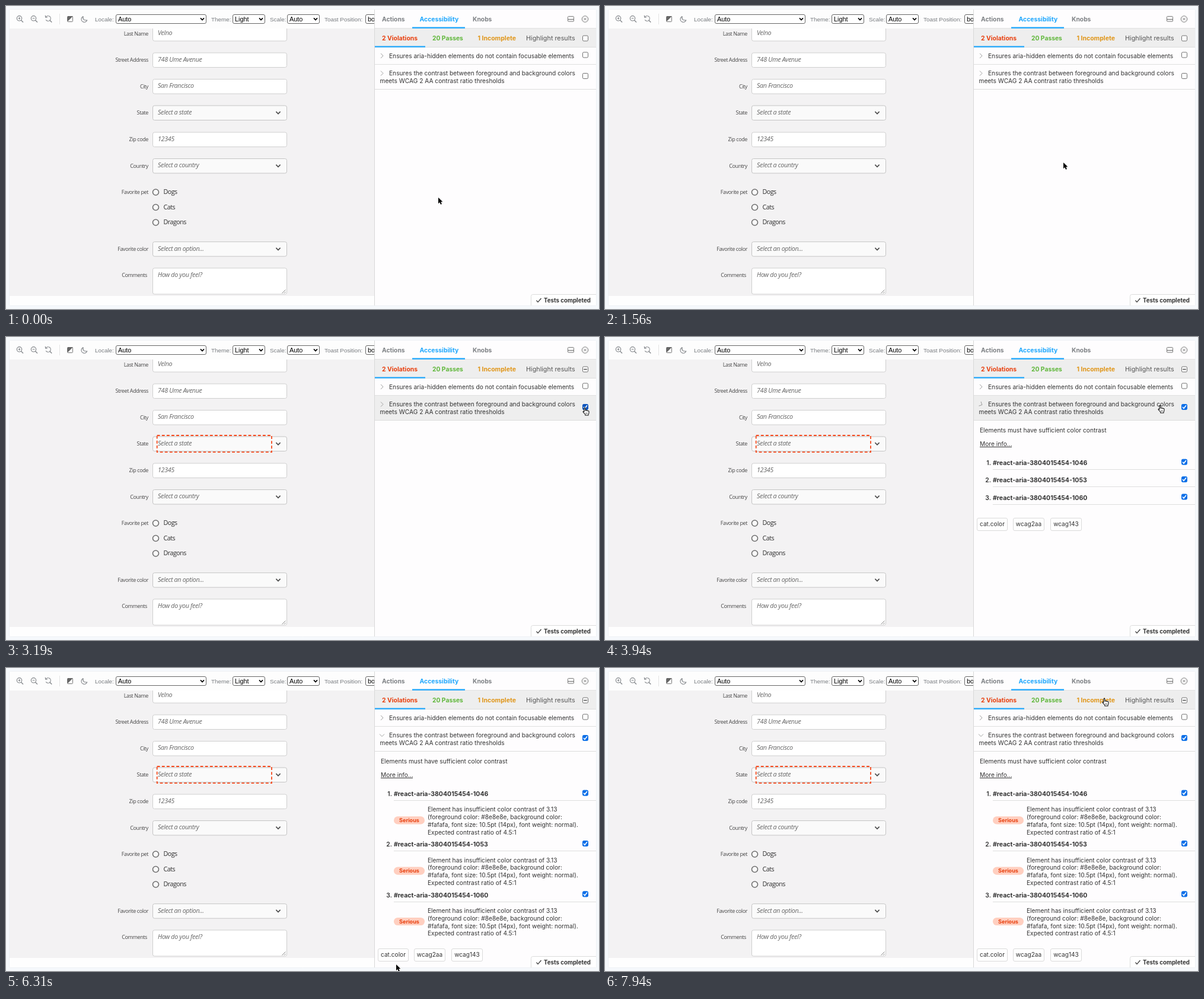
An HTML page with a canvas that plays this animation: 1000 by 511 pixels, repeating every 8000 ms.

```html
<!DOCTYPE html>
<html lang="en">
<head>
<meta charset="utf-8">
<style>
html, body { margin: 0; width: 100%; height: 100%; overflow: hidden; background: #f6f9fc; }
canvas { display: block; }
</style>
</head>
<body>
<canvas id="stage" width="1000" height="511"></canvas>
<script>
const ctx = document.getElementById('stage').getContext('2d');
const LOOP = 8000, CHECKED_AT = 2750, CLICK_AT = 3900, OPEN_AT = 4040;
const UI = 'Inter, sans-serif', FORM = '"Open Sans", sans-serif', NATIVE = '"Liberation Sans", sans-serif';
const INK = '#333', BLUE = '#1ea7fd', RED = '#e8400f';

// Pointer stops: time, x, y
const STOPS = [
  [0, 729, 323], [1150, 729, 323], [1560, 773, 264], [2350, 974, 119], [3250, 974, 119],
  [3700, 934, 115], [4200, 934, 115], [4900, 795, 406], [5400, 795, 406],
  [6200, 658, 500], [6700, 658, 500], [7700, 840, 51], [8000, 840, 51]
];

function pointerAt(time) {
  const i = Math.max(1, STOPS.findIndex(s => s[0] > time));
  const [t0, x0, y0] = STOPS[i - 1], [t1, x1, y1] = STOPS[i];
  const p = (time - t0) / (t1 - t0), e = p * p * (3 - 2 * p);
  return { x: x0 + (x1 - x0) * e, y: y0 + (y1 - y0) * e };
}

function text(str, x, y, size = 10.2, { font = UI, style = '', color = INK, align = 'left', spacing = 0 } = {}) {
  ctx.font = `${style} ${size}px ${font}`;
  ctx.letterSpacing = spacing + 'px';
  ctx.textAlign = align;
  ctx.fillStyle = color;
  ctx.fillText(str, x, y);
}

function rect(x, y, w, h, color) {
  ctx.fillStyle = color;
  ctx.fillRect(x, y, w, h);
}

function box(x, y, w, h, radius, fill, stroke, width = 1) {
  ctx.beginPath();
  ctx.roundRect(x, y, w, h, radius);
  if (fill) { ctx.fillStyle = fill; ctx.fill(); }
  if (stroke) { ctx.strokeStyle = stroke; ctx.lineWidth = width; ctx.stroke(); }
}

function line(color, width, ...points) {
  ctx.beginPath();
  for (let i = 0; i < points.length; i += 2) ctx.lineTo(points[i], points[i + 1]);
  ctx.strokeStyle = color;
  ctx.lineWidth = width;
  ctx.stroke();
}

function arc(x, y, r, color, width, from = 0, to = Math.PI * 2) {
  ctx.beginPath();
  ctx.arc(x, y, r, from, to);
  ctx.strokeStyle = color;
  ctx.lineWidth = width;
  ctx.stroke();
}

function chevronDown(x, y, w, h, color, width) {
  line(color, width, x - w, y - h, x, y + h, x + w, y - h);
}

function checkbox(x, y, state, hover) {
  const on = state === 'on';
  const blue = hover ? '#0b55bd' : '#0a6fe8';
  box(x - 4.5, y - 4.5, 9, 9, 1.8, on ? blue : '#fff', on ? blue : '#707070');
  if (on) line('#fff', 1.6, x - 3, y, x - 1, y + 2.4, x + 3, y - 2.8);
  if (state === 'mixed') line('#444', 1.4, x - 2.8, y, x + 2.8, y);
}

function nativeSelect(x, w, value) {
  box(x + .5, 14.5, w - 1, 15, 2.5, '#fff', '#666');
  text(value, x + 4, 26, 10.9, { font: NATIVE, color: '#000' });
  chevronDown(x + w - 7, 22, 3, 1.6, '#000', 1.7);
}

function toolbar() {
  rect(6, 6, 616, 32, '#fdfdfd');
  const grey = '#808488';
  [22.5, 46.5].forEach((x, i) => {
    arc(x, 20.8, 4.2, grey, 1.1);
    line(grey, 1.3, x + 3, 24, x + 6.5, 27.5);
    line(grey, 1, x - 2, 20.8, x + 2, 20.8);
    if (!i) line(grey, 1, x, 18.8, x, 22.8);
  });
  arc(71, 21, 4.3, grey, 1.1, -2.6, 2.6);
  line(grey, 1.1, 66.3, 15.8, 66.8, 19.2, 70, 19);
  line(grey, 1.3, 74, 24.2, 77.3, 27.5);
  rect(90, 13, 1, 18, '#e4e4e4');
  box(103.5, 17.5, 9, 9, 1, '#fff', '#777');
  ctx.beginPath();
  ctx.moveTo(104, 17); ctx.lineTo(113, 17); ctx.lineTo(104, 26);
  ctx.fillStyle = '#666';
  ctx.fill();
  ctx.beginPath();
  ctx.arc(132, 22.3, 5, 4.35, .35, true);
  ctx.quadraticCurveTo(128, 24.5, 130.4, 17.5);
  ctx.strokeStyle = grey;
  ctx.lineWidth = 1.1;
  ctx.stroke();

  [['Locale:', 150], ['Theme:', 346], ['Scale:', 445], ['Toast Position:', 537]].forEach(([label, x]) =>
    text(label, x, 25.6, 9.9, { font: NATIVE, color: '#777b7f' }));
  nativeSelect(185, 153, 'Auto');
  nativeSelect(382, 55, 'Light');
  nativeSelect(474, 55, 'Auto');
  nativeSelect(606, 80, 'bottom');
}

function field(label, placeholder, y, { picker = false, height = 25, labelRight = 240 } = {}) {
  const top = y - 12.5;
  text(label, labelRight, y + 3, 9, { font: FORM, color: '#464646', align: 'right', spacing: -.39 });
  box(247.5, top + .5, 226, height - .5, 3, picker ? '#fafafa' : '#fff', picker ? '#c4c4c4' : '#cfcfcf');
  text(placeholder, 256, y + 2.9, 10.7, { font: FORM, style: 'italic', color: '#646464', spacing: -.3 });
  if (picker) chevronDown(459, y, 3.6, 1.8, '#4b4b4b', 1.7);
}

function form(highlighted) {
  rect(6, 38, 616, 451, '#f3f2f3');
  rect(6, 489, 616, 16, '#fefefe');
  field('Last Name', 'Velno', 46.5);
  field('Street Address', '748 Ume Avenue', 91);
  field('City', 'San Francisco', 135.5);
  field('State', 'Select a state', 180, { picker: true });
  field('Zip code', '12345', 225);
  field('Country', 'Select a country', 269.5, { picker: true });
  text('Favorite pet', 240, 317.2, 9, { font: FORM, color: '#464646', align: 'right', spacing: -.39 });
  ['Dogs', 'Cats', 'Dragons'].forEach((pet, i) => {
    const y = 314 + i * 25.5;
    ctx.beginPath();
    ctx.arc(252.5, y, 5, 0, 7);
    ctx.fillStyle = '#fafafa';
    ctx.fill();
    arc(252.5, y, 5, '#707070', 1.6);
    text(pet, 265.5, y + 3.4, 10.7, { font: FORM, color: '#2c2c2c', spacing: -.5 });
  });
  field('Favorite color', 'Select an option...', 409.7, { picker: true });
  field('Comments', 'How do you feel?', 454, { height: 44.5, labelRight: 238 });
  line('#777', .9, 465.5, 484.5, 471.5, 478.5);
  line('#777', .9, 469, 484.5, 471.5, 482);
  if (highlighted) {
    ctx.setLineDash([4.9, 3.2]);
    ctx.strokeStyle = '#f54a1e';
    ctx.lineWidth = 1.8;
    ctx.strokeRect(254.7, 166, 193.3, 28.2);
    ctx.setLineDash([]);
  }
}

function rowArrow(y, angle) {
  ctx.save();
  ctx.translate(634, y);
  ctx.rotate(angle);
  line('#a0a0a0', 1, -2, -4, 2, 0, -2, 4);
  ctx.restore();
}

function details(open) {
  text('Elements must have sufficient color contrast', 632, 160.8);
  text('More info...', 632, 184);
  rect(632, 185, 54, 1, INK);
  const pitch = open ? 85.3 : 29.4;
  for (let i = 0; i < 3; i++) {
    const y = 216 + i * pitch;
    text(`${i + 1}.`, 651, y, 10.4, { style: '600', align: 'right' });
    text(`#react-aria-3804015454-${1046 + i * 7}`, 654, y, 10.5, { style: 'bold' });
    checkbox(977, y - 5.3, 'on');
    rect(654, Math.round(y + 7), 341, 1, '#dedede');
    if (!open) continue;
    box(654, y + 34.3, 52, 13.2, 6.6, '#ffcfc0');
    text('Serious', 680, y + 44.1, 9.1, { style: 'bold', color: RED, align: 'center' });
    ['Element has insufficient color contrast of 3.13',
      '(foreground color: #8e8e8e, background color:',
      '#fafafa, font size: 10.5pt (14px), font weight: normal).',
      'Expected contrast ratio of 4.5:1'].forEach((s, n) => text(s, 711, y + 26.4 + n * 12.75));
  }
  const tagY = open ? 473 : 305;
  [['cat.color', 627, 51], ['wcag2aa', 688, 52], ['wcag143', 751, 52]].forEach(([tag, x, w]) => {
    box(x + .5, tagY + .5, w, 21, 2.5, '#fff', '#dadada');
    text(tag, x + .5 + w / 2, tagY + 14.2, 10.1, { align: 'center' });
  });
}

function panel(time, pointer) {
  const checked = time >= CHECKED_AT;
  const hoverRow = pointer.x > 622 && pointer.y > 99 && pointer.y < 140;
  rect(622, 6, 373, 499, '#fefdfe');

  text('Actions', 634, 25.6, 10.3, { style: 'bold', color: '#7d8084' });
  text('Accessibility', 697.5, 25.6, 10.4, { style: 'bold', color: BLUE });
  text('Knobs', 787, 25.6, 10.3, { style: 'bold', color: '#7d8084' });
  box(947.5, 17.5, 10, 8.5, 1, null, '#777');
  rect(948, 22, 9, 1.2, '#777');
  arc(976.5, 22, 5.2, '#777', 1);
  line('#777', 1, 974.4, 19.9, 978.6, 24.1);
  line('#777', 1, 974.4, 24.1, 978.6, 19.9);

  rect(622, 38, 373, 32, '#eeeeee');
  rect(622, 37, 373, 1, '#e2e2e2');
  rect(685, 35.5, 89, 2.3, BLUE);
  rect(622, 69, 373, 1, '#dddddd');
  rect(622, 67.5, 85, 2.2, BLUE);
  text('2 Violations', 634, 57.6, 10.4, { style: 'bold', color: RED });
  text('20 Passes', 719, 57.6, 10.3, { style: 'bold', color: '#5fb73a' });
  text('1 Incomplete', 795.5, 57.6, 10.5, { style: 'bold', color: '#e0961a' });
  text('Highlight results', 877, 57.6, 10.8, { color: '#555' });
  checkbox(977, 54.5, checked ? 'mixed' : 'off');

  if (hoverRow) rect(622, 99, 373, 41, '#eeeeee');
  rect(622, 98, 373, 1, '#e0e0e0');
  rect(622, 140, 373, 1, '#dcdcdc');
  rowArrow(84, 0);
  text('Ensures aria-hidden elements do not contain focusable elements', 646, 87.8);
  checkbox(977, 82.5, 'off');
  const turn = Math.min(1, Math.max(0, (time - CLICK_AT) / (OPEN_AT - CLICK_AT)));
  rowArrow(113.5, turn * Math.PI / 2);
  text('Ensures the contrast between foreground and background colors', 646, 117.4);
  text('meets WCAG 2 AA contrast ratio thresholds', 630.5, 130.1);
  checkbox(977, 118, checked ? 'on' : 'off', hoverRow && pointer.x > 965);
  if (time >= CLICK_AT) details(time >= OPEN_AT);

  rect(621, 6, 1, 499, '#d8d8d8');
  box(885.5, 486.5, 112, 20, [3, 0, 0, 0], '#fff', '#dcdcdc');
  line('#333', 1.2, 894.5, 496.5, 897, 499.3, 902.5, 493);
  text('Tests completed', 907, 499.5, 9.75, { style: 'bold', color: INK });
}

const ARROW = new Path2D('M0 0V10.2L2.4 8L4 11.8L5.9 11L4.3 7.3H7.4Z');
const HAND = new Path2D('M1 1.2Q2 -.4 3 1.2V5Q4.2 4 5 5.2Q6.2 4.4 7 5.6Q8.5 5 9 6.6V9Q8.8 10.5 8 11.5V13H2.8V11.5L-.8 7.6Q-1 6 .4 6.5L1 7.2Z');

function cursor({ x, y }) {
  const overTab = y > 38 && y < 69 && x < 870;
  const overRow = y > 69 && y < 140;
  ctx.save();
  ctx.translate(x, y);
  ctx.lineJoin = 'round';
  if (overTab || overRow) {
    ctx.fillStyle = '#fff';
    ctx.fill(HAND);
    ctx.strokeStyle = '#111';
    ctx.lineWidth = 1.1;
    ctx.stroke(HAND);
    line('#111', .7, 4, 8.5, 4, 11);
    line('#111', .7, 6, 8.5, 6, 11);
  } else {
    ctx.strokeStyle = '#fff';
    ctx.lineWidth = 1.6;
    ctx.stroke(ARROW);
    ctx.fillStyle = '#000';
    ctx.fill(ARROW);
  }
  ctx.restore();
}

function draw(now) {
  const time = now % LOOP, pointer = pointerAt(time);
  rect(0, 0, 1000, 511, '#f6f9fc');
  box(5.5, 5.5, 990, 500, 1, '#fefefe', '#eef1f4');
  form(time >= CHECKED_AT);
  toolbar();
  ctx.save();
  ctx.beginPath();
  ctx.rect(621, 6, 374, 499);
  ctx.clip();
  panel(time, pointer);
  ctx.restore();
  cursor(pointer);
  requestAnimationFrame(draw);
}
requestAnimationFrame(draw);
</script>
</body>
</html>
```
